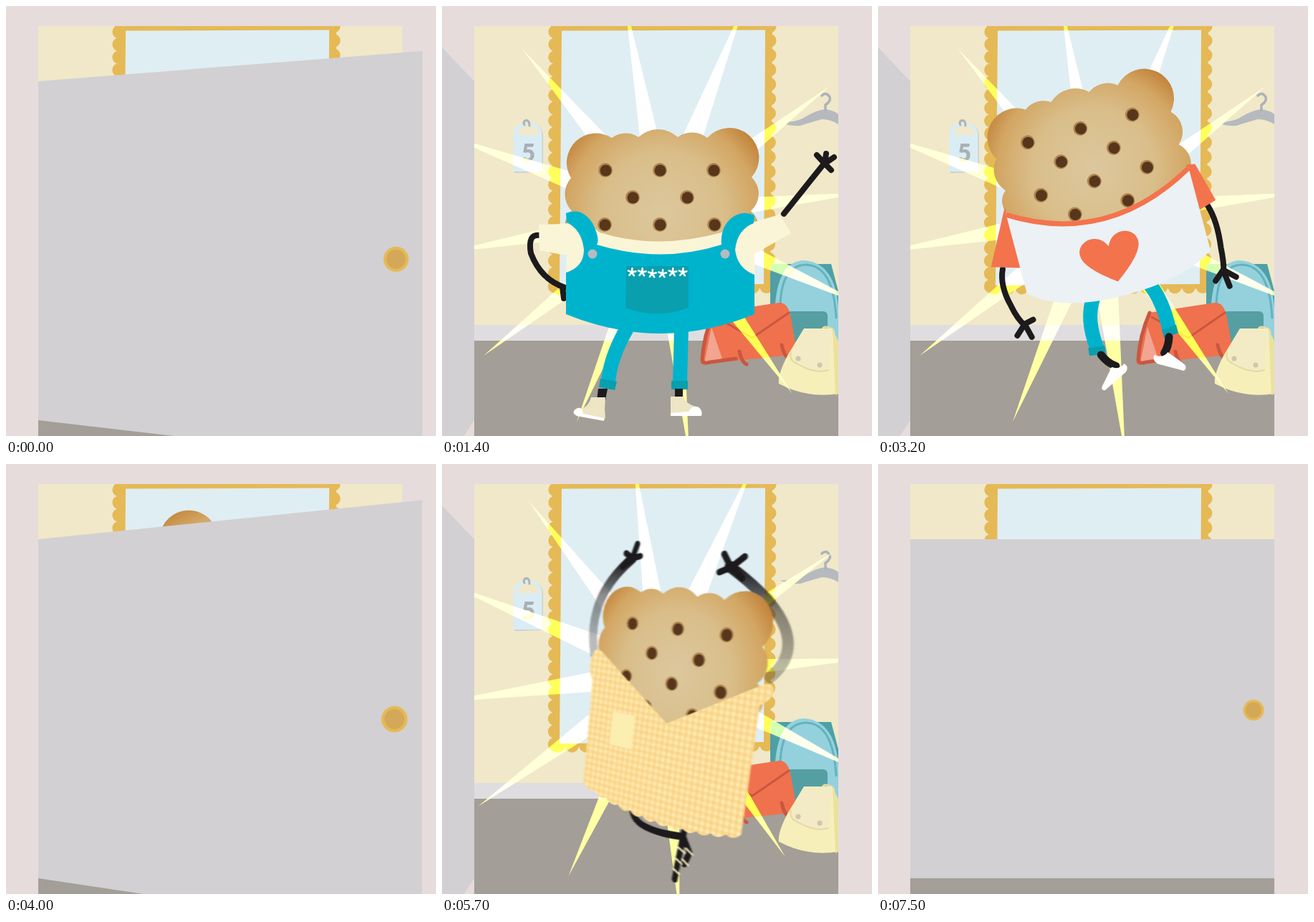
Recreate the animation shown at these times as an HTML page. Size 600 px wide and 600 px high, loop 7600 ms.

```html
<!DOCTYPE html>
<html lang="en">
<head>
<meta charset="utf-8">
<title>Biscuit dressing room</title>
<style>
html, body { margin: 0; width: 100%; height: 100%; overflow: hidden; background: #e6dcdc; }
svg, #dress { position: absolute; left: 0; top: 0; width: 600px; height: 600px; }
#dress { clip-path: inset(28px 47px 0 45px); filter: url(#blur); }
#spin { overflow: visible; transform-origin: 0 0; }
#room { isolation: isolate; }
#rays { mix-blend-mode: color-dodge; fill: #a0a014; }
.limb { fill: none; stroke: #1c1a1c; stroke-width: 8; stroke-linecap: round; stroke-linejoin: round; }
.trouser { fill: none; stroke: #00b3cd; stroke-width: 20; }
</style>
</head>
<body>
<svg id="scene" viewBox="0 0 600 600"></svg>
<div id="dress"><svg id="spin" viewBox="0 0 600 600"></svg></div>
<svg id="front" viewBox="0 0 600 600"></svg>
<script>
const LOOP = 7600, STEP = 100;
const HINGE = 45, DOOR_WIDTH = 508, DOOR_TOP = 105, DOOR_BOTTOM = 578;
const EYE = { x: 300, y: 296, distance: 830 };
const OPEN = 85;

const path = (d, fill, extra = '') => `<path d="${d}" fill="${fill}" ${extra}/>`;
const line = (d, stroke, width) =>
  `<path d="${d}" fill="none" stroke="${stroke}" stroke-width="${width}" stroke-linecap="round"/>`;
const limb = (d, style = '') => `<path class="limb" d="${d}" style="${style}"/>`;
const dot = (x, y, r, fill) => `<circle cx="${x}" cy="${y}" r="${r}" fill="${fill}"/>`;
const rect = (x, y, w, h, fill) => `<rect x="${x}" y="${y}" width="${w}" height="${h}" fill="${fill}"/>`;
const repeat = (n, draw) => Array.from({ length: n }, (_, i) => draw(i)).join('');

function mirror() {
  const gold = '#e5b955';
  return path('M157 28H461L458 394L155 395Z', gold)
    + repeat(21, i => dot(158 - i * 0.03, 36 + i * 17.75, 9.6, gold))
    + repeat(18, i => dot(457 - i * 0.1, 28 + i * 20.3, 9.6, gold))
    + repeat(16, i => dot(162 + i * 19.4, 393 - i * 0.1, 9.6, gold))
    + path('M167 34.5L451 33.5L449 388L164 390Z', '#dfeef3');
}

function tag() {
  return path('M101 233V180Q102 164 121 163Q140 164 141 181V232Z', '#c9d3cf')
    + path('M99.500 231V178Q101 163 120 162Q139 163 139.500 180V231Z', '#daecf4')
    + path('M106 180Q107 167 121 167Q134 167 135 180Z', '#f0e8c8')
    + line('M122 167Q122 158 116 160Q113 162 115 166', '#adb3b8', 3)
    + `<text x="120.500" y="217" text-anchor="middle" font-family="Lato, sans-serif"
        font-weight="900" font-size="33" fill="#a9b0b4">5</text>`;
}

function hanger() {
  return path('M472 162Q490 163 503 157Q522 145 535 144Q548 146 553 151V165Q542 158 530 158Q512 163 500 167Q482 168 472 162Z', '#b6babf')
    + line('M535 146V138Q543 133 541 127Q536 119 530 125', '#adb2b8', 3.5);
}

function bags() {
  const teal = '#4f9fa6', rust = '#c9573f';
  return path('M459 360H543L553 398V460H458V375Z', teal)
    + path('M465 470V415Q470 356 505 355Q548 358 553 420V470Z', '#94d1dc')
    + line('M472 430Q470 362 508 361Q546 362 550 435', '#62b3c0', 3)
    + path('M480 433Q480 426 488 426H531Q538 426 538 433V470H480Z', '#559fa3')
    + path('M378 428L470 414Q481 413 486 430L496 486L361 500Q366 450 378 428Z', '#f0714e')
    + path('M376 448L392 495L366 498Z', '#f2a591')
    + line('M379 428Q365 460 363 494Q364 500 374 497L410 492', rust, 5)
    + line('M484 428L433 463L382 434', rust, 3)
    + line('M415 482Q418 497 425 500M474 473Q477 488 484 492', rust, 5)
    + line('M531 452Q532 446 540 449Q546 450 547 456', '#e5dca6', 3)
    + path('M505 450H544L553 468V541Q510 548 470 527Q468 515 482 488Z', '#f6efb9')
    + path('M545 452L553 468V541L549 543Z', '#ebe19e')
    + path('M505 451L487 484Q484 494 495 499Q521 514 539 508L545 452Z', '#f3ebc6')
    + line('M487 484Q484 494 495 499Q521 514 539 508', '#e3d9a4', 2)
    + dot(497, 492, 3.5, '#cfc7a6') + dot(527, 501, 3.5, '#cfc7a6');
}

function biscuit() {
  const holes = [[228, 229], [304, 229], [379, 229], [266, 267], [342, 267],
    [227, 305], [304, 305], [380, 305], [266, 343], [342, 343]];
  const outline = 'M180 240A41 41 0 0 1 237 184A32 32 0 0 1 274 183A40 40 0 0 1 329 183'
    + 'A34 34 0 0 1 370 184A41 41 0 0 1 432 239A32 32 0 0 1 431 286A30 30 0 0 1 433 330'
    + 'L430 365H180L177 320A24 24 0 0 1 181 286A34 34 0 0 1 180 240Z';
  return path(outline, 'url(#crust)')
    + holes.map(([x, y]) => dot(x, y, 10, '#b08450') + dot(x + 0.5, y + 0.5, 8, '#57361b')).join('');
}

const flower = (x, y) => `<path transform="translate(${x} ${y})" stroke="#fff" stroke-width="2.600"
  stroke-linecap="round" d="${repeat(5, i => {
    const a = (i * 72 - 85) * Math.PI / 180;
    return `M0 0L${(5.5 * Math.cos(a)).toFixed(1)} ${(5.5 * Math.sin(a)).toFixed(1)}`;
  })}"/>`;

function dungarees() {
  const blue = '#00b3cd', cream = '#fbf5d8';
  const shoe = 'M0 0H20L19 18Q21 30 18 32L-16 26Q-27 23 -22 19Q-4 16 0 0Z';
  return limb('M137 320Q119 317 124 345Q138 382 172 393M168 392L170 408')
    + `<g id="wave">${limb('M477 290L533 220M523 208L534 220L547 211M536 206L534 220L543 229')}</g>`
    + '<path class="trouser" d="M258 450Q235 490 232 524M334 450L332 526"/>'
    + path('M221 520L244 524L241 536L219 532Z', '#0a9fae') + rect(320, 523, 23, 12, '#0a9fae')
    + path('M218 534H231L228 550H216Z', '#1c1a1c') + rect(325, 534, 11, 12, '#1c1a1c')
    + path(shoe, '#eee5c5', 'transform="translate(208 546)"')
    + path('M184 569Q182 564 189 561Q196 559 197 569L226 575V579L188 572Z', '#fff')
    + path('M319 545H337Q340 556 358 560Q364 564 362 572H319Z', '#eee5c5')
    + path('M344 566Q350 556 358 560Q364 564 362 572H319V568Z', '#fff')
    + biscuit()
    + path('M176 303Q205 302 220 316Q300 341 390 316Q410 296 436 300L436 375Q300 395 173 375Z', cream)
    + path('M135 305Q160 305 190 302L198 347H168L136 341Z', cream)
    + path('M430 303L471 291L487 317L436 346Z', cream)
    + path('M173 289Q195 280 210 303Q221 325 216 333Q305 360 390 333Q388 308 405 295Q420 285 436 292'
      + 'L435 303Q412 312 409 340Q412 366 436 375V430Q305 484 173 430V372Q198 364 198 340Q195 312 174 302Z', blue)
    + dot(210, 346, 6.5, '#b4bcc0') + dot(395, 346, 6.5, '#b4bcc0')
    + path('M257 363H344V421Q300 438 256 421Z', '#0a9fae')
    + repeat(6, i => flower(265 + i * 14.2, 371.5 + (i > 1 && i < 4 ? 2 : 0)));
}

function heartShirt() {
  const orange = '#f3734d';
  return limb('M149 391Q139 412 147 443Q151 464 159 475M145 486L159 473L164 493M159 473L172 470')
    + limb('M448 378Q456 402 451 440Q450 460 446 474M432 483L446 471L449 495M446 471L461 485')
    + '<path class="trouser" d="M261 462Q243 488 248 532M341 462Q354 490 352 533"/>'
    + path('M236 528L259 531L258 542L235 539Z', '#0a9fae') + path('M342 530L363 528V540L342 542Z', '#0a9fae')
    + limb('M251 542Q257 556 267 562M349 542Q345 555 337 562', 'stroke-width:11')
    + path('M261 562Q270 569 279 562Q285 568 278 574L244 591Q238 590 241 585Z', '#fff')
    + path('M342 562Q333 569 323 561Q317 567 324 574L357 593Q363 591 360 584Z', '#fff')
    + biscuit()
    + path('M174 308L134 384L174 396Z', orange) + path('M434 316L446 318L461 374L434 382Z', orange)
    + path('M173 318Q300 396 436 320V440Q390 470 305 470Q215 470 173 433Z', '#ebf1f4')
    + `<path d="M173 319Q300 398 436 321" fill="none" stroke="${orange}" stroke-width="7"/>`
    + path('M300 449Q258 419 258 401C258 380 290 374 300 398C310 374 342 380 342 401Q342 419 300 449Z', orange);
}

function ginghamDress() {
  // The hem is a shallow bow from right to left with a small ruffle.
  const hem = repeat(12, i => {
    const at = n => [434 - 263 * n, 484 - 10 * n + 80 * n * (1 - n)];
    const [cx, cy] = at((i + 0.5) / 12), [x, y] = at((i + 1) / 12);
    return `Q${cx} ${cy + 9} ${x} ${y}`;
  });
  const outline = `M163 282Q168 268 180 276L303 361L431 291Q447 280 454 289Q456 303 438 313L434 484${hem}L167 318Q155 300 163 282Z`;
  return limb('M166 281Q140 200 216 137M372 140Q508 215 447 276', 'stroke-width:15;stroke:url(#sweep)')
    + limb('M204 130L216 137L222 116M216 137L229 133M200 150L216 137', 'stroke-width:9')
    + limb('M362 124L374 141L392 126M358 148L374 141L392 154', 'stroke-width:9')
    + limb('M262 488Q262 522 345 510', 'stroke-width:10')
    + limb('M350 503L346 545L344 571M349 508L362 528L356 546', 'stroke-width:9')
    + line('M344 526L355 531M340 541L352 547M340 557L350 562M356 524L367 530M352 540L362 546', '#eee5b5', 3)
    + biscuit()
    + path(outline, '#fdebb4') + path(outline, 'url(#gingham)')
    + rect(210, 360, 40, 48, '#fbeeb0');
}

const rayTips = [[255, -8], [424, -8], [111, 59], [541, 112], [5, 180], [593, 260],
  [5, 344], [590, 418], [58, 488], [489, 541], [188, 580], [345, 628]];
function ray([x, y]) {
  const cx = 308, cy = 291, spread = 0.066;
  const dx = x - cx, dy = y - cy;
  return `M${x} ${y}L${cx - dy * spread} ${cy + dx * spread}L${cx + dy * spread} ${cy - dx * spread}Z`;
}

const part = id => document.getElementById(id);
part('scene').innerHTML = `
<defs>
  <radialGradient id="crust" gradientUnits="userSpaceOnUse" cx="307" cy="290" r="172">
    <stop offset="0" stop-color="#dcc79d"/><stop offset=".5" stop-color="#d9be8a"/>
    <stop offset=".78" stop-color="#d3a663"/><stop offset="1" stop-color="#bd7a30"/>
  </radialGradient>
  <linearGradient id="sweep" gradientUnits="userSpaceOnUse" x1="0" y1="140" x2="0" y2="260">
    <stop offset="0" stop-color="#1c1a1c"/><stop offset=".45" stop-color="#1c1a1c" stop-opacity=".5"/>
    <stop offset="1" stop-color="#1c1a1c" stop-opacity=".3"/>
  </linearGradient>
  <pattern id="gingham" width="9" height="9" patternUnits="userSpaceOnUse">
    <rect width="4.500" height="9" fill="#f9c66c" opacity=".45"/>
    <rect width="9" height="4.500" fill="#f9c66c" opacity=".38"/>
  </pattern>
  <filter id="blur" x="-5%" y="-5%" width="110%" height="110%" color-interpolation-filters="sRGB">
    <feGaussianBlur id="smear" stdDeviation="0 0"/>
  </filter>
  <clipPath id="doorway"><rect x="45" y="28" width="508" height="572"/></clipPath>
</defs>
${rect(0, 0, 600, 600, '#e6dcdc')}
<g id="room" clip-path="url(#doorway)">
  ${rect(45, 28, 508, 572, '#f0e8c8')}${rect(45, 445, 508, 22, '#e0dde0')}${rect(45, 467, 508, 133, '#a39e97')}
  ${mirror()}${tag()}${hanger()}${bags()}
  <path id="rays" d="${rayTips.map(ray).join('')}"/>
  <g id="dungarees">${dungarees()}</g>
  <g id="heart">${heartShirt()}</g>
</g>`;
part('spin').innerHTML = ginghamDress();
part('front').innerHTML = `<path id="door" fill="#d2d0d2"/>
<g id="knob">${dot(0, 0, 14.5, '#e5b955')}${dot(0, 0, 11, '#d3a858')}</g>`;

const show = (id, on) => { part(id).style.display = on ? '' : 'none'; };
const place = (id, transform) => part(id).setAttribute('transform', transform);

// Door angle in degrees: start of each swing, then one value per step.
const swings = [
  [0, [17.2, 50, 76, OPEN]],
  [1700, [83, 21.3, 0, 17.2, 50, 76, OPEN]],
  [3900, [83, 21.3, 0, 17.2, 50, 76, OPEN]],
  [6300, [83, 50, 0]]
];
function doorAngle(t) {
  const [start, angles] = swings.filter(s => s[0] <= t).pop();
  return angles[Math.min(angles.length - 1, Math.floor((t - start) / STEP))];
}

function onDoor(distance, angle) {
  const a = angle * Math.PI / 180;
  const scale = EYE.distance / (EYE.distance - distance * Math.sin(a));
  return {
    scale,
    x: EYE.x + (HINGE + distance * Math.cos(a) - EYE.x) * scale,
    y: h => EYE.y + (h - EYE.y) * scale
  };
}

function drawDoor(angle) {
  const edge = onDoor(DOOR_WIDTH, angle), grip = onDoor(479, angle);
  part('door').setAttribute('d',
    `M${HINGE} ${DOOR_TOP}L${edge.x} ${edge.y(DOOR_TOP)}V${edge.y(DOOR_BOTTOM)}L${HINGE} ${DOOR_BOTTOM}Z`);
  const squeeze = Math.min(1, 1.07 * Math.cos(angle * Math.PI / 180));
  place('knob', `translate(${grip.x} ${grip.y(343.5)}) scale(${grip.scale * squeeze} ${grip.scale})`);
}

function drawSpin(t) {
  const turn = Math.max(-360, -67 + 0.564 * (t - 5000));
  const blur = 2.4 * Math.abs(Math.sin(turn * Math.PI / 180));
  part('spin').style.transform = 'translate(302.5px, 280px) perspective(960px) translateY(23.5px) '
    + `rotateY(${turn}deg) rotateZ(7.5deg) translate(-283px, -305px)`;
  part('smear').setAttribute('stdDeviation', `${blur.toFixed(2)} .4`);
}

function draw(time) {
  const t = Math.floor((time % LOOP) / STEP) * STEP;
  const within = (from, to) => t >= from && t < to;
  drawDoor(doorAngle(t));

  show('dungarees', within(0, 1900));
  show('heart', within(1900, 4100));
  show('dress', within(4100, 6500));
  show('rays', within(700, 1700) || within(2600, 3800) || within(4700, 6300));
  place('rays', `rotate(${(t / STEP) % 2 ? 2.3 : 0} 308 291)`);

  const waving = within(700, 1700) ? Math.sin((t - 1400) / 400 * Math.PI) : 0;
  place('wave', `rotate(${10 * waving} 477 295)`);

  const hop = t > 2400 ? Math.sin((t - 2400) / 640 * Math.PI) : 0;
  place('heart', `translate(${5 * hop} ${-86 * Math.abs(hop)}) rotate(${21 * hop} 305 300)`);

  drawSpin(t);
}

function tick() {
  draw(performance.now());
  requestAnimationFrame(tick);
}
tick();
</script>
</body>
</html>
```
